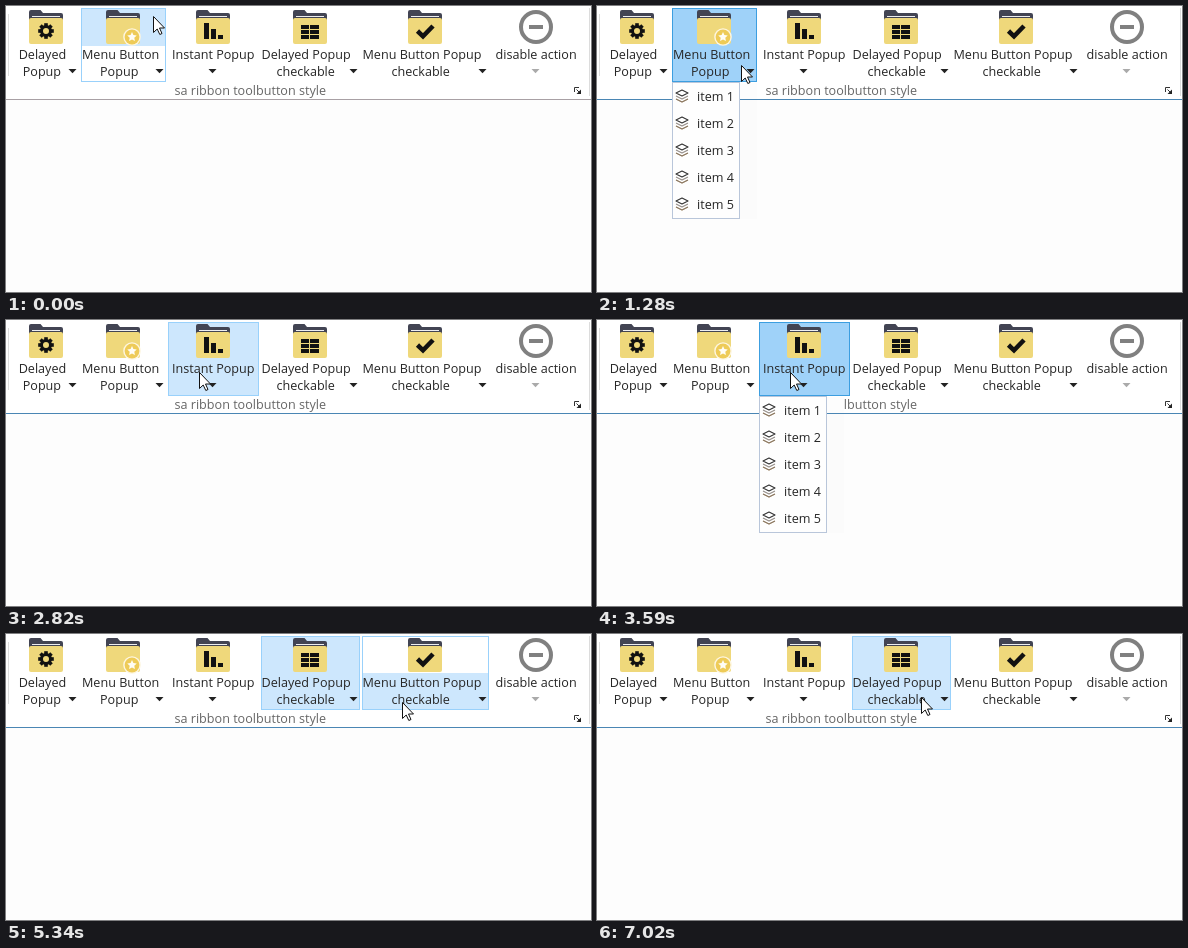
An HTML page for the animation above (8 s loop, 585 px wide and 286 px high).

```html
<!DOCTYPE html>
<html lang="en">
<head>
<meta charset="utf-8">
<title>Ribbon tool buttons</title>
<style>
html, body { margin: 0; width: 100%; height: 100%; overflow: hidden; background: #fdfdfd; }
svg { display: block; }
text { font: 12.6px "Open Sans", "Noto Sans", sans-serif; fill: #262626; white-space: pre; }
.muted { fill: #666; }
.tip { fill: #575757; }
</style>
</head>
<body>
<svg id="stage" width="585" height="286" viewBox="0 0 585 286">
  <defs>
    <linearGradient id="tipFill" x1="0" y1="0" x2="0" y2="1">
      <stop offset="0" stop-color="#fff"/><stop offset="1" stop-color="#e4e5f0"/>
    </linearGradient>
    <g id="folder">
      <path d="M-17 14V6q0-2 2-2h9.500l2.500 3H15q2 0 2 2V14z" fill="#424453"/>
      <path d="M-14 10.500H14" stroke="#eeeef0"/>
      <rect x="-17" y="12" width="34" height="26" rx="2" fill="#efd87b"/>
    </g>
    <g id="layers" fill="none" stroke-width="1.100" stroke-linejoin="round">
      <path d="M-6 3L0 6L6 3" stroke="#d9b98c"/>
      <path d="M-6 0L0 3L6 0M-6 3L0 6L6 3" stroke="#5b5048" stroke-opacity=".65"/>
      <path d="M0-6L6-3L0 0L-6-3z" stroke="#333" fill="#fff"/>
    </g>
  </defs>
</svg>
<script>
const stage = document.getElementById('stage');
const LOOP = 8000;
const HOVER = '#cde7fd', EDGE = '#99d1fb', PRESS = '#9fd2f9', PRESS_EDGE = '#3c9ee0';
const RULE_PALE = '#a8a0a4', RULE_BLUE = '#4a86b4';

function add(tag, attrs, parent = stage) {
  const el = document.createElementNS('http://www.w3.org/2000/svg', tag);
  for (const key in attrs) el.setAttribute(key, attrs[key]);
  parent.append(el);
  return el;
}
const box = (x, y, w, h, fill, parent, extra) =>
  add('rect', { x, y, width: w, height: h, fill, ...extra }, parent);
const path = (d, attrs, parent) => add('path', { d, ...attrs }, parent);
function label(str, x, y, parent, cls = '') {
  add('text', { x, y, class: cls }, parent).textContent = str;
}
const show = (el, on) => { el.style.display = on ? '' : 'none'; };

function star(cx, cy, r) {
  const pts = [];
  for (let i = 0; i < 10; i++) {
    const a = i * Math.PI / 5, k = i % 2 ? r * 0.48 : r;
    pts.push([cx + k * Math.sin(a), cy - k * Math.cos(a)].map(v => v.toFixed(2)));
  }
  return 'M' + pts.join('L') + 'z';
}

const icons = {
  gear(g) {
    for (let a = 0; a < 360; a += 45)
      box(-1.8, 17.2, 3.6, 4, '#111', g, { transform: `rotate(${a} 0 25)` });
    add('circle', { cy: 25, r: 4.5, fill: 'none', stroke: '#111', 'stroke-width': 3 }, g);
  },
  star(g) {
    add('circle', { cx: 9, cy: 31, r: 8.8, fill: '#fdf6e0' }, g);
    add('circle', { cx: 9, cy: 31, r: 7.4, fill: '#eecb58' }, g);
    path(star(9, 31, 5), { fill: '#fffdf5' }, g);
  },
  bars(g) {
    [[-9, 17], [-2, 23], [5, 29]].forEach(([x, y]) => box(x, y, 5, 33 - y, '#111', g));
  },
  table(g) {
    for (let y = 19; y < 33; y += 5) {
      box(-9, y, 8, 4, '#111', g);
      box(0, y, 9, 4, '#111', g);
    }
  },
  check(g) {
    path('M-7.500 25L-2 30.300L8 20', { fill: 'none', stroke: '#111', 'stroke-width': 4.6 }, g);
  },
  minus(g) {
    add('circle', { cy: 21, r: 15, fill: 'none', stroke: '#808080', 'stroke-width': 4 }, g);
    box(-7, 19, 14, 4, '#808080', g);
  }
};

// left and right edge, icon, icon centre, text lines with x, arrow centre
const buttons = [
  [11, 72, 'gear', 40, [['Delayed', 12.7], ['Popup', 16.7]], 66.5],
  [75, 159, 'star', 117, [['Menu Button', 76], ['Popup', 94]], 153.5],
  [162, 252, 'bars', 207, [['Instant Popup', 166]], 206.5],
  [255, 353, 'table', 304, [['Delayed Popup', 255.5], ['checkable', 270.5]], 347.5],
  [356, 482, 'check', 419, [['Menu Button Popup', 356.5], ['checkable', 385.5]], 476.5],
  [485, 575, 'minus', 530, [['disable action', 489.5]], 529.5]
];

box(0, 0, 585, 93, '#fff');
box(2, 8, 1, 62, '#dcdcdc');
box(583, 2, 1, 88, '#dcdcdc');
const rule = box(0, 93, 585, 1, RULE_PALE);
label('sa ribbon toolbutton style', 168.5, 89, stage, 'muted');
path('M568.500 86V81.500H573M570.500 83.500L573 86', { fill: 'none', stroke: '#333' });
path('M575 83.500V88H570.500z', { fill: '#222' });

const faces = buttons.map(([x0, x1, icon, cx, lines, ax]) => {
  const fill = box(x0, 2, x1 - x0, 74, HOVER);
  const edge = box(x0 + 0.5, 2.5, x1 - x0, 73, 'none', stage, { stroke: EDGE });
  const g = add('g', { transform: `translate(${cx} 0)` });
  if (icon !== 'minus') add('use', { href: '#folder' }, g);
  icons[icon](g);
  lines.forEach(([str, x], i) => label(str, x, 53 + 17 * i));
  path(`M${ax - 4} 63h8l-4 4.200z`, { fill: icon === 'minus' ? '#aaa' : '#222' });
  return { fill, edge };
});

function makePopup(x) {
  const g = add('g', {});
  box(x + 68, 77, 17, 16, '#fdfdfd', g);
  box(x + 68, 94, 17, 119, '#fbfbfb', g);
  box(x + 0.5, 76.5, 67, 136, '#fefefe', g, { stroke: '#b9c6da' });
  for (let i = 0; i < 5; i++) {
    const y = 90 + 27 * i;
    add('use', { href: '#layers', transform: `translate(${x + 10} ${y})` }, g);
    label('item ' + (i + 1), x + 25, y + 5, g);
  }
  return g;
}
const popups = { 1: makePopup(75), 2: makePopup(162) };

const tip = add('g', {});
box(430.5, 73.5, 180, 20, 'url(#tipFill)', tip, { stroke: '#767676' });
label('Menu Button Popup checkable', 435.5, 88, tip, 'tip');

const cursor = path('M.5 .5V16.500L4.200 13L6.800 18.500L9 17.500L6.500 12H11.500z',
  { fill: '#fff', stroke: '#111', 'stroke-linejoin': 'round' });

// time, cursor x, cursor y, button modes
const steps = [
  [0, 147, 10, { 1: 'top' }],
  [670, 144, 30, { 1: 'top' }],
  [820, 144, 45, { 1: 'low' }],
  [970, 144, 59, { 1: 'low' }],
  [1280, 144, 59, { 1: 'press' }],
  [2210, 144, 59, { 1: 'low' }],
  [2520, 149, 58, { 1: 'low' }],
  [2670, 189, 52, { 2: 'all' }],
  [2820, 193, 52, { 2: 'all' }],
  [3590, 193, 52, { 2: 'press' }],
  [4050, 193, 52, { 2: 'all' }],
  [4200, 270, 62, { 3: 'all' }],
  [4320, 328, 73, { 3: 'all' }],
  [5340, 396, 68, { 3: 'all', 4: 'low' }],
  [5460, 428, 65, { 3: 'all', 4: 'low' }],
  [6360, 352, 114, { 3: 'all' }],
  [6510, 308, 78, { 3: 'all' }],
  [6630, 282, 48, { 3: 'all' }],
  [6750, 283, 56, { 3: 'all' }],
  [6900, 306, 60, { 3: 'all' }],
  [7020, 324, 63, { 3: 'all' }]
];
const spans = { all: [2, 74], press: [2, 74], top: [2, 38], low: [39, 37] };

function paintFace({ fill, edge }, mode) {
  show(fill, mode);
  show(edge, mode);
  if (!mode) return;
  const [y, h] = spans[mode], pressed = mode === 'press';
  fill.setAttribute('y', y);
  fill.setAttribute('height', h);
  fill.setAttribute('fill', pressed ? PRESS : HOVER);
  edge.setAttribute('stroke', pressed ? PRESS_EDGE : EDGE);
}

function draw(t) {
  const [, x, y, modes] = steps.findLast(s => s[0] <= t);
  faces.forEach((face, i) => paintFace(face, modes[i]));
  for (const i in popups) show(popups[i], modes[i] === 'press');
  show(tip, t >= 6210 && t < 6510);
  rule.setAttribute('fill', t < 270 ? RULE_PALE : RULE_BLUE);
  cursor.setAttribute('transform', `translate(${x} ${y})`);
}

const start = performance.now();
function tick() {
  draw((performance.now() - start) % LOOP);
  requestAnimationFrame(tick);
}
tick();
</script>
</body>
</html>
```
